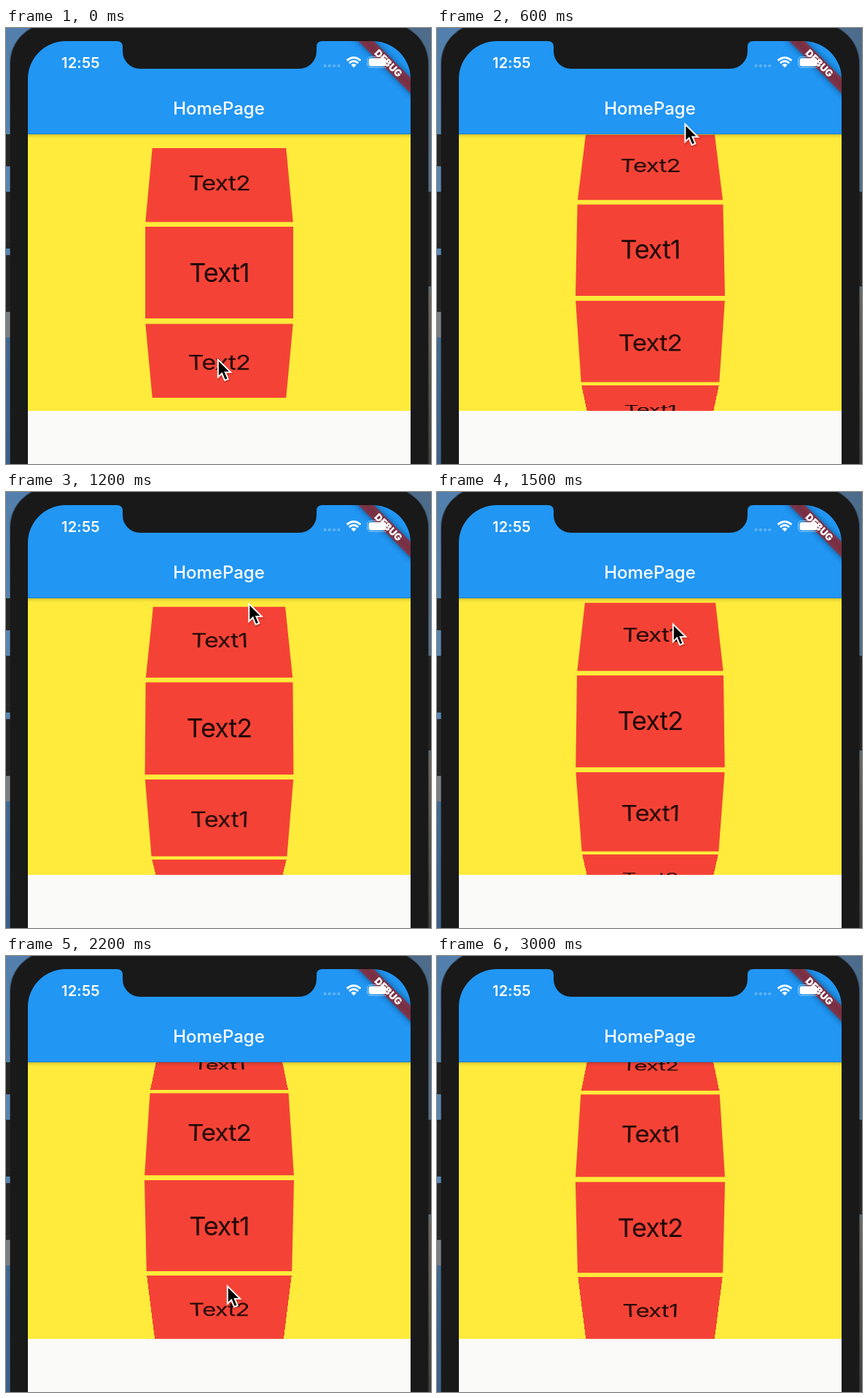
These frames come from a looping animation (583x599 px, 3100 ms). An HTML page:

```html
<!DOCTYPE html>
<html lang="en">
<head>
<meta charset="utf-8">
<title>Wheel list</title>
<style>
  html, body { margin: 0; width: 100%; height: 100%; overflow: hidden; background: #1a1a1a; }
  #stage { position: absolute; left: 0; top: 0; width: 583px; height: 599px; overflow: hidden; font-family: Inter, Roboto, sans-serif; }
  svg { position: absolute; left: 0; top: 0; }
  #wheel { position: absolute; left: 30px; top: 146px; width: 525px; height: 380px; overflow: hidden; background: #ffeb3b; }
  .item {
    position: absolute; left: 161.1px; top: 126.6px; width: 202.8px; height: 126.8px;
    background: #f44336; color: rgba(0, 0, 0, .87);
    font-size: 36px; line-height: 126.8px; letter-spacing: -1px; text-align: center;
    transform-origin: 50% 50%;
  }
</style>
</head>
<body>
<div id="stage">
  <svg width="583" height="599" viewBox="0 0 583 599">
    <defs>
      <linearGradient id="left" x2="0" y2="1">
        <stop offset="0" stop-color="#527fab"/>
        <stop offset=".5" stop-color="#5c89b3"/>
        <stop offset=".72" stop-color="#42698f"/>
        <stop offset="1" stop-color="#3c628a"/>
      </linearGradient>
      <linearGradient id="right" x2="0" y2="1">
        <stop offset="0" stop-color="#4d6c8b"/>
        <stop offset=".58" stop-color="#566d82"/>
        <stop offset=".62" stop-color="#6a655b"/>
        <stop offset="1" stop-color="#403f3d"/>
      </linearGradient>
      <clipPath id="clip"><use href="#screen"/></clipPath>
      <filter id="blur" x="-50%" y="-100%" width="200%" height="300%"><feGaussianBlur stdDeviation="4.5"/></filter>
    </defs>
    <rect width="292" height="599" fill="url(#left)"/>
    <rect x="292" width="291" height="599" fill="url(#right)"/>
    <path d="M0 390H6V425H0Z" fill="#7b8085"/>
    <path d="M0 146H8V190H0ZM0 225H8V303H0ZM0 312H8V390H0ZM577 225H583V355H577Z" fill="#262626"/>
    <rect x="6" y="-6" width="573" height="720" rx="55" fill="#191919" stroke="#191919" stroke-opacity=".45" stroke-width="2"/>
    <path id="screen" fill="#2196f3" d="M30 599V70A52 52 0 0 1 82 18H152Q160 18 160 26V32A24 24 0 0 0 184 56H402A24 24 0 0 0 426 32V26Q426 18 434 18H503A52 52 0 0 1 555 70V599Z"/>
    <rect x="30" y="520" width="525" height="79" fill="#fafaf9"/>
    <g clip-path="url(#clip)">
      <g transform="translate(555 18) rotate(45)">
        <rect x="-60" y="35.5" width="120" height="15.2" opacity=".5" filter="url(#blur)"/>
        <rect x="-60" y="35.5" width="120" height="15.2" fill="#b71c1c" fill-opacity=".63"/>
        <text y="47.9" font-size="13.5" font-weight="900" fill="#fff" text-anchor="middle">DEBUG</text>
      </g>
    </g>
    <g fill="#fff">
      <text x="76" y="55" font-size="20" font-weight="600" letter-spacing=".2">12:55</text>
      <text x="292" y="119" font-size="24" font-weight="500" text-anchor="middle">HomePage</text>
      <g opacity=".3">
        <circle cx="437.5" cy="52" r="2"/><circle cx="443.8" cy="52" r="2"/>
        <circle cx="450.1" cy="52" r="2"/><circle cx="456.4" cy="52" r="2"/>
      </g>
      <path d="M477 54.5L473.3 50.6Q477 47.6 480.7 50.6Z"/>
      <path d="M470.8 48.2Q477 42.8 483.2 48.2M467.6 44.6Q477 36.6 486.4 44.6" fill="none" stroke="#fff" stroke-width="2.8"/>
      <rect x="495.5" y="39.5" width="28" height="15" rx="4.5" fill="none" stroke="#fff" stroke-opacity=".45"/>
      <rect x="497.5" y="41.5" width="24" height="11" rx="3"/>
      <path d="M525 44.5Q527.5 47 525 49.5Z" opacity=".5"/>
    </g>
  </svg>
  <div id="wheel"></div>
  <svg width="583" height="599" viewBox="0 0 583 599">
    <defs>
      <linearGradient id="shade" x2="0" y2="1">
        <stop offset="0" stop-opacity=".22"/>
        <stop offset=".4" stop-opacity=".08"/>
        <stop offset="1" stop-opacity="0"/>
      </linearGradient>
      <path id="arrow" d="M0 0V27L6 21.3L10.4 32L15.6 29.8L11.2 19.4H19.5Z"/>
    </defs>
    <rect x="30" y="145.5" width="525" height="6.5" fill="url(#shade)"/>
    <g id="cursor">
      <g id="ring" fill="none">
        <circle r="38" stroke="#fff" stroke-opacity=".8" stroke-width="4.6"/>
        <circle r="38" stroke="#000" stroke-width="2.5"/>
      </g>
      <g transform="translate(.8 1.6) scale(.89)">
        <use href="#arrow" transform="translate(1 2)" fill="none" stroke="#000" stroke-opacity=".12" stroke-width="4"/>
        <use href="#arrow" stroke="#fff" stroke-width="2.2"/>
      </g>
    </g>
  </svg>
</div>
<script>
  const LOOP = 3100, STEP = 100;
  const RADIUS = 380, PERSPECTIVE = .003 / 1.268;
  const ITEM_ANGLE = Math.PI / 9;          // turn of the drum per item

  const wheel = document.getElementById('wheel');
  const cursor = document.getElementById('cursor');
  const ring = document.getElementById('ring');
  const items = Array.from({ length: 5 }, () => {
    const el = document.createElement('div');
    el.className = 'item';
    return wheel.appendChild(el);
  });

  // time, x, y, easing power of the way to this point
  const path = [
    [0, 290, 454, 1], [300, 322, 166, 1.25], [400, 338, 135, 1], [900, 342, 124, 1],
    [1500, 323, 180, 1], [1700, 322, 182, 1], [2000, 303, 452, 1.3], [2200, 303, 452, 1],
    [2600, 310, 440, 1], [2700, 312, 446, 1], [3000, 335, 640, 1.3], [3100, 335, 640, 1]
  ];

  const mix = (a, b, u) => a + (b - a) * u;

  // Scroll position in items: drag up, glide, drag down, glide.
  function scrollAt(t) {
    const glideUp = x => 5.206 - .334 * Math.exp((900 - x) * .00353);
    const glideDown = x => .675 + 1.06 * Math.exp((2200 - x) * .00402);
    if (t < 300) return glideUp(300) * (t / 300) ** 1.25;
    if (t < 1700) return glideUp(t);
    if (t < 2000) return mix(glideUp(1700), glideDown(2000), ((t - 1700) / 300) ** 1.3);
    return glideDown(t);
  }

  function cursorAt(t) {
    const i = path.findIndex(p => p[0] > t);
    const [t0, x0, y0] = path[i - 1], [t1, x1, y1, power] = path[i];
    const u = ((t - t0) / (t1 - t0)) ** power;
    return [mix(x0, x1, u), mix(y0, y1, u)];
  }

  function placeItem(el, index, scroll) {
    const d = index - scroll, a = d * ITEM_ANGLE;
    const s = Math.sin(a), c = Math.cos(a), p = PERSPECTIVE;
    const m = [1, 0, 0, 0, 0, c, 0, p * s, 0, 0, 1, 0, 0, RADIUS * s, 0, 1 + p * RADIUS * (1 - c)];
    el.style.visibility = Math.abs(d) < 2 ? 'visible' : 'hidden';
    el.style.transform = `matrix3d(${m.map(v => v.toFixed(7)).join()})`;
    el.textContent = index % 2 ? 'Text2' : 'Text1';
  }

  function draw(t) {
    const scroll = scrollAt(t), first = Math.round(scroll) - 2;
    items.forEach((el, i) => placeItem(el, first + i, scroll));
    cursor.setAttribute('transform', `translate(${cursorAt(t)})`);
    const pressed = (t >= 100 && t < 400) || (t >= 1700 && t < 2000);
    ring.setAttribute('visibility', pressed ? 'visible' : 'hidden');
  }

  const start = performance.now();
  function tick() {
    const t = (performance.now() - start) % LOOP;
    draw(Math.floor(t / STEP) * STEP);
    requestAnimationFrame(tick);
  }
  tick();
</script>
</body>
</html>
```
